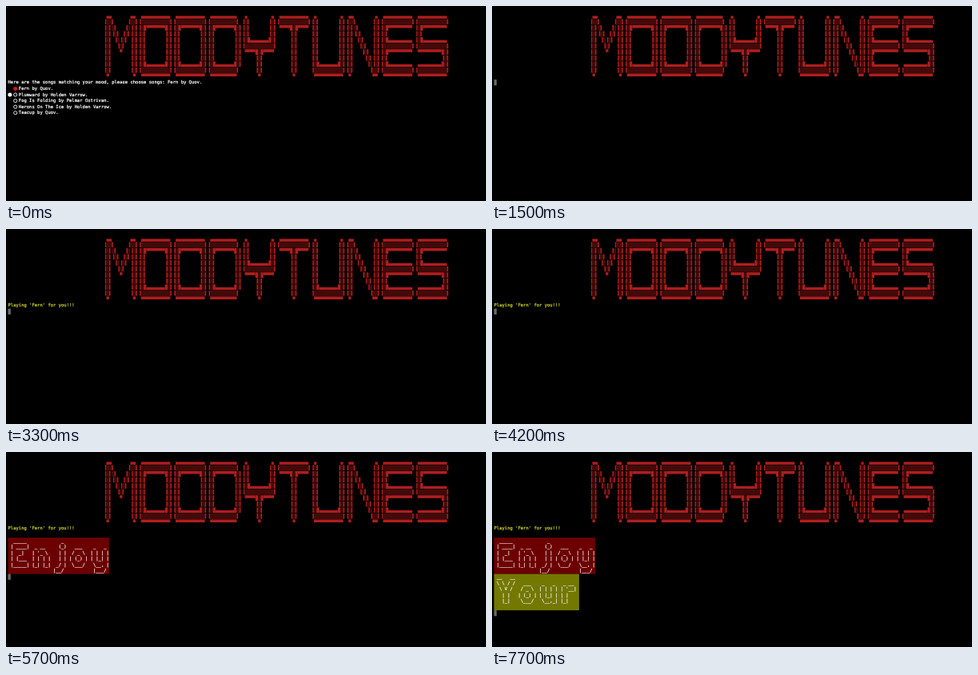
An HTML page with a canvas for the animation above (8 s loop, 600x244 px).

```html
<!DOCTYPE html>
<html lang="en">
<head>
<meta charset="utf-8">
<title>Moodytunes</title>
<style>
html, body { margin: 0; width: 100%; height: 100%; overflow: hidden; background: #000; }
canvas { display: block; width: 600px; height: 244px; }
</style>
</head>
<body>
<canvas id="stage" width="600" height="244"></canvas>
<script>
const ctx = document.getElementById('stage').getContext('2d');
const LOOP = 8000;
const CW = 3.325, RH = 7.57;      // terminal cell
const LEFT = 2.5, TOP = 8.8;
const FIRST = 11;                 // first text row below the banner
const FONT = '5.52px "DejaVu Sans Mono", "Liberation Mono", monospace';
const RED = '#b01e1e', SHADE = '#420a0a', HOT = '#d01818', WHITE = '#fff';

const colX = c => LEFT + c * CW;
const rowY = r => TOP + r * RH;

// Banner letters: 13 columns by 11 rows of block characters
const topBar = ' ▄▄▄▄▄▄▄▄▄▄▄ ', endBar = ' ▀▀▀▀▀▀▀▀▀▀▀ ';
const full = '▐░░░░░░░░░░░▌', sides = '▐░▌       ▐░▌';
const archTop = '▐░█▀▀▀▀▀▀▀█░▌', archEnd = '▐░█▄▄▄▄▄▄▄█░▌';
const armTop = '▐░█▀▀▀▀▀▀▀▀▀ ', armEnd = '▐░█▄▄▄▄▄▄▄▄▄ ';
const stemTop = ' ▀▀▀▀█░█▀▀▀▀ ', stem = '     ▐░▌     ', stemEnd = '      ▀      ';
const left = '▐░▌          ', tips = ' ▄         ▄ ';
const rep = (s, n) => Array(n).fill(s);

const LETTERS = {
  M: [' ▄▄       ▄▄ ', '▐░░▌     ▐░░▌', '▐░▌░▌   ▐░▐░▌', '▐░▌▐░▌ ▐░▌▐░▌',
      '▐░▌ ▐░▐░▌ ▐░▌', '▐░▌  ▐░▌  ▐░▌', '▐░▌   ▀   ▐░▌', ...rep(sides, 3), ' ▀         ▀ '],
  O: [topBar, full, archTop, ...rep(sides, 5), archEnd, full, endBar],
  D: [' ▄▄▄▄▄▄▄▄▄▄  ', '▐░░░░░░░░░░▌ ', archTop, ...rep(sides, 5), archEnd,
      '▐░░░░░░░░░░▌ ', ' ▀▀▀▀▀▀▀▀▀▀  '],
  Y: [tips, ...rep(sides, 3), archEnd, full, stemTop, ...rep(stem, 3), stemEnd],
  T: [topBar, full, stemTop, ...rep(stem, 7), stemEnd],
  U: [tips, ...rep(sides, 7), archEnd, full, endBar],
  N: [' ▄▄        ▄ ', '▐░░▌      ▐░▌', '▐░▌░▌     ▐░▌', '▐░▌▐░▌    ▐░▌',
      '▐░▌ ▐░▌   ▐░▌', '▐░▌  ▐░▌  ▐░▌', '▐░▌   ▐░▌ ▐░▌', '▐░▌    ▐░▌▐░▌',
      '▐░▌     ▐░▐░▌', '▐░▌      ▐░░▌', ' ▀        ▀▀ '],
  E: [topBar, full, armTop, left, armEnd, full, armTop, left, armEnd, full, endBar],
  S: [topBar, full, armTop, left, armEnd, full, ' ▀▀▀▀▀▀▀▀▀█░▌', '          ▐░▌',
      ' ▄▄▄▄▄▄▄▄▄█░▌', full, endBar]
};

// x, y, width, height as parts of a cell
const BLOCKS = {
  '▄': [0, .47, 1, .45], '▀': [0, 0, 1, .47], '█': [0, 0, 1, .92],
  '▐': [.5, 0, .5, .88], '▌': [0, 0, .5, .88], '░': [0, 0, 1, .95]
};

// Runs of one block are drawn as a single bar, so cells join without seams
function drawBanner() {
  [...'MOODYTUNES'].forEach((ch, i) => LETTERS[ch].forEach((line, r) => {
    for (const run of line.matchAll(/([^ ])\1*/g)) {
      const [x, y, w, h] = BLOCKS[run[1]];
      ctx.fillStyle = run[1] === '░' ? SHADE : RED;
      ctx.fillRect(colX(36 + i * 13 + run.index + x), rowY(r + y), w * run[0].length * CW, h * RH);
    }
  }));
}

// Each character sits on the terminal grid; a hairline outline firms up the strokes
function write(text, col, row, color) {
  ctx.font = FONT;
  ctx.fillStyle = ctx.strokeStyle = color;
  ctx.lineWidth = .22;
  const y = rowY(FIRST + row) + 5.3;
  [...text].forEach((ch, i) => {
    if (ch === ' ') return;
    ctx.fillText(ch, colX(col + i), y);
    ctx.strokeText(ch, colX(col + i), y);
  });
}

function cursor(row) {
  ctx.fillStyle = '#6a6a6a';
  ctx.fillRect(LEFT, rowY(FIRST + row), CW, RH - .3);
}

function dot(x, row, color, filled) {
  ctx.beginPath();
  ctx.arc(x, rowY(FIRST + row) + 3.8, filled ? 2.5 : 2.1, 0, 7);
  ctx.fillStyle = ctx.strokeStyle = color;
  ctx.lineWidth = .85;
  filled ? ctx.fill() : ctx.stroke();
}

const SONGS = ['Fern by Quov.', 'Plumward by Holden Varrow.', 'Fog Is Folding by Pelmar Ostrivan.',
  'Herons On The Ice by Holden Varrow.', 'Teacup by Quov.'];

function drawPicker(count) {
  const picked = SONGS.slice(0, count).join(', ');
  write('Here are the songs matching your mood, please choose songs: ' + picked, 0, 0, WHITE);
  SONGS.forEach((song, i) => {
    dot(11.7, i + 1, i < count ? HOT : WHITE, i < count);
    write(song, 4, i + 1, WHITE);
  });
  dot(4.9, 2, WHITE, true);
}

function drawPrompt() {
  write('Which one do you want to listen to?', 0, 0, WHITE);
  write('(Use ↑/↓ arrow keys, press Enter to select)', 37, 0, '#b81616');
  dot(4.9, 1, HOT, true);
  write(SONGS[0], 2, 1, HOT);
  write(SONGS[1], 2, 2, WHITE);
}

const ENJOY = [
  '  _____             _                 ',
  ' | ____|  _ __     (_)   ___    _   _ ',
  " |  _|   | '_ \\    | |  / _ \\  | | | |",
  ' | |___  | | | |   | | | (_) | | |_| |',
  ' |_____| |_| |_|  _/ |  \\___/   \\__, |',
  '                 |__/           |___/ '
];
const YOUR = [
  ' __   __                        ',
  ' \\ \\ / /   ___    _   _   _ __  ',
  "  \\ V /   / _ \\  | | | | | '__| ",
  '   | |   | (_) | | |_| | | |    ',
  '   |_|    \\___/   \\__,_| |_|    ',
  ''
];

function drawWord(lines, row, color) {
  ctx.fillStyle = color;
  ctx.fillRect(LEFT, rowY(FIRST + row), lines[0].length * CW, 6 * RH);
  lines.forEach((line, i) => write(line, 0, row + i, WHITE));
}

function draw(t) {
  ctx.fillStyle = '#000';
  ctx.fillRect(0, 0, 600, 244);
  drawBanner();
  if (t < 400) return drawPicker(t < 100 ? 1 : 2);
  if (t < 1500) return drawPrompt();
  if (t < 2600) return cursor(0);

  write("Playing 'Fern' for you!!!", 0, 0, '#ccd424');
  if (t >= 4600) drawWord(ENJOY, 2, '#6c0000');
  if (t >= 6600) drawWord(YOUR, 8, '#737800');
  cursor(t < 4600 ? 1 : t < 6600 ? 8 : 14);
}

const start = performance.now();
function tick() {
  draw((performance.now() - start) % LOOP);
  requestAnimationFrame(tick);
}
draw(0);
requestAnimationFrame(tick);
</script>
</body>
</html>
```
